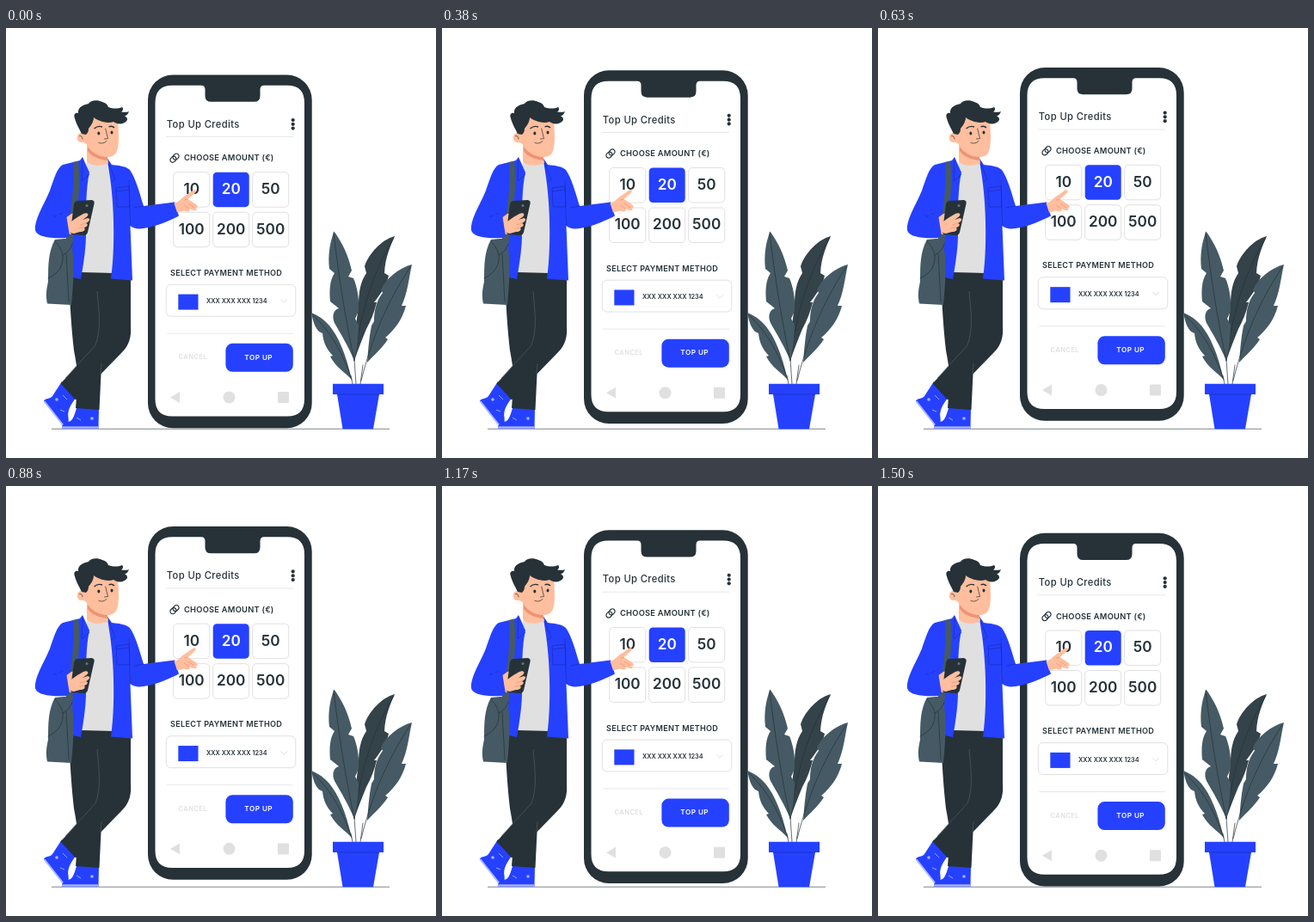
Write an HTML page that moves like this. It is 500 by 500 pixels and loops after 1540 ms.

```html
<!DOCTYPE html>
<html lang="en">
<head>
<meta charset="utf-8">
<title>Top up</title>
<style>
  html, body { margin: 0; width: 100%; height: 100%; overflow: hidden; background: #fff; }
  svg { display: block; width: 100%; height: 100%; }
  text { font-family: Inter, "Open Sans", sans-serif; font-weight: 600; fill: #263238; }
  .blue { fill: #2541ff; }
  .dark { fill: #263238; }
  .slate { fill: #455a64; }
  .skin { fill: #ffbe9d; }
  .grey { fill: #e0e0e0; }
  .box { fill: #fff; stroke: #e0e0e0; }
  .line { fill: none; stroke: #263238; stroke-width: .7; stroke-linecap: round; stroke-linejoin: round; }
  .seam { fill: none; stroke: #1a2db3; stroke-width: .7; }
  .rule { stroke: #e6e6e6; stroke-width: .9; }
</style>
</head>
<body>
<svg viewBox="0 0 500 500">
  <path d="M53 466.200H446" stroke="#263238" stroke-width=".6"/>

  <g id="phone">
    <rect class="dark" x="165" y="54.500" width="190.700" height="410.700" rx="29"/>
    <path fill="#fff" d="M193.500 66.800H227Q231.500 66.800 231.500 71.500V79Q231.500 85.800 238.500 85.800H288.500Q295.500 85.800 295.500 79V71.500Q295.500 66.800 300 66.800H327Q347 66.800 347 87V431.500Q347 451.500 327 451.500H193.500Q173.500 451.500 173.500 431.500V87Q173.500 66.800 193.500 66.800Z"/>

    <text x="186.800" y="115.700" font-size="11.200" letter-spacing=".38" style="font-weight:500">Top Up Credits</text>
    <g class="dark">
      <circle cx="333.700" cy="107" r="2.100"/>
      <circle cx="333.700" cy="111.800" r="2.100"/>
      <circle cx="333.700" cy="116.600" r="2.100"/>
    </g>
    <path class="rule" d="M186 126.500H334"/>

    <g class="line" transform="translate(196 151.200) rotate(-45)" style="stroke-width:1.200">
      <rect x="-6" y="-2.900" width="7.600" height="5.800" rx="2.900"/>
      <rect x="-1.600" y="-2.900" width="7.600" height="5.800" rx="2.900"/>
    </g>
    <text x="207" y="154.300" font-size="9.300" letter-spacing=".25">CHOOSE AMOUNT (€)</text>
    <g id="amounts" text-anchor="middle" font-size="17.200"></g>

    <text x="191" y="287.900" font-size="9.100" letter-spacing=".3">SELECT PAYMENT METHOD</text>
    <rect class="box" x="186.300" y="298.300" width="150.500" height="36.900" rx="5.500"/>
    <rect class="blue" x="200.300" y="309.600" width="23.200" height="18"/>
    <text x="233" y="320.300" font-size="7.300" letter-spacing=".05">XXX XXX XXX 1234</text>
    <path d="M319.300 315.800L323 319.400L326.700 315.800" fill="none" stroke="#e0e0e0"/>

    <path class="rule" d="M187 355.200H334"/>
    <text x="200.500" y="385.500" font-size="7.600" letter-spacing=".35" style="fill:#e0e0e0">CANCEL</text>
    <rect class="blue" x="255.400" y="366.800" width="78.400" height="33" rx="8"/>
    <text x="277.300" y="385.600" font-size="8.200" letter-spacing=".45" style="fill:#fff">TOP UP</text>

    <g class="grey">
      <path d="M191 429.400L202 423V436Z"/>
      <circle cx="259.500" cy="429.400" r="7"/>
      <rect x="316" y="423" width="13" height="13" rx="1"/>
    </g>
  </g>

  <g id="plant">
    <path class="line" d="M405 385L407 414M401 404L403 414M415 392L412 414"/>
    <path class="slate" d="M355 331C363 334 370 339 376 346C386 358 395 378 402 409C394 400 384 395 377 382L380 381C373 374 369 366 368 355L364 353C359 348 357 341 355 331Z"/>
    <path class="line" d="M357 334C377 353 391 376 402 409"/>
    <path d="M452 242C437 246 422 262 417 277L419 285C412 295 410 308 410 322L408 338C405 354 404 370 405 387C409 375 414 362 419 350C424 341 428 331 431 319L428 319C436 309 443 298 445 288L440 285C441 266 447 254 452 242Z" fill="#344249"/>
    <path class="line" d="M451 244C428 282 413 325 405 387"/>
    <path class="slate" d="M472 275C457 279 442 291 436 304L438 308C430 318 428 330 428 341L425 346C422 361 421 375 420 389C428 380 437 373 444 362L441 360C453 350 461 338 465 323L460 323C467 308 468 293 472 275Z"/>
    <path class="line" d="M470 278C449 310 428 350 413 410"/>
    <path class="slate" d="M381.500 236.500C377 248 374 264 376 280L382 285C376 294 376 306 377 318L387 326C380 328 379 336 382 343C390 357 398 370 405 387C408 374 410 358 410 345L406 338L410 329C411 314 408 300 404 291L398 289L402 282C398 264 391 250 381.500 236.500Z"/>
    <path class="line" d="M381 238C387 290 395 340 405 387"/>
    <path class="blue" d="M380 413.700H439V426H434L427 466.300H391.500L385 426H380Z"/>
    <path class="seam" d="M385 426H434"/>
  </g>

  <g id="shoes">
    <path class="blue" d="M65 411L82 429C75 438 71 445 72.500 453C73.500 461 71 465 67 462L44 433.500C46 430 51 432 54 428Z"/>
    <path d="M44.500 434L67 462.500" stroke="#a8b3ff" stroke-width="2"/>
    <path class="blue" d="M83 439L108 441L107.500 466H65C64 461 69 459 75 457C79 454 80 448 83 439Z"/>
    <path d="M65 464.500H107.500" stroke="#a8b3ff" stroke-width="2.500"/>
    <g fill="#a8b3ff">
      <circle cx="59" cy="432" r="1.800"/>
      <circle cx="100" cy="454" r="1.800"/>
    </g>
    <path d="M66 427L71 432M63 444L68 446M82 453L87 456" fill="none" stroke="#a8b3ff" stroke-width=".9"/>
  </g>

  <g id="legs">
    <path class="dark" d="M73 282C74 318 76 350 79 375C82 391 84 403 83 415L81 442L108.500 444L111 392L122 340L119 286Z"/>
    <path class="dark" d="M88 282L145 286L145 346C146 360 143 369 135 377L81 432.500L63.500 413.500L104 369C109 361 111 352 110 340Z"/>
    <path d="M106 306C108 330 111 350 104 369L69 407M111 390L110 402" fill="none" stroke="#56636a" stroke-width=".6"/>
  </g>

  <g id="body">
    <path class="grey" d="M94 155L119 156L125 172L130 235L126 285L87 284L90 190Z"/>
    <path class="blue" d="M117.500 151L123 159C132 160 140 161 144 165C151 175 155 191 160 207L196 202.500L201 218.500C188 225 174 231 160 233C153 234 148 233 144.500 230L147 293.500L122 291.500C126 265 127 217 121 174Z"/>
    <path class="blue" d="M89 150L97 168C93 186 93 208 93 239C93 254 91 269 87 292L73 289L70 244C56 245 36 244 34 235C33 222 45 204 51 189C56 175 59 163 66 159L86 154Z"/>
    <path class="seam" d="M118 154L127 176L122 179M128 186L143 184L144 208L129 208ZM128 190L143 188M143 177C144 195 143 213 145 230M160 207L149 209M89 153L88 178L97 170M66 215C61 218 58 219 55 219"/>
    <path class="slate" d="M78 156L84 155C87 177 85 205 77 247L70 247C76 210 80 184 78 156Z"/>
    <path class="slate" d="M57 246L78 244L77 257C80 275 78 301 76 322L48 320.500C46 311 47 304 49 295C49 276 49 260 57 246Z"/>
    <path class="line" d="M57 248C62 254 67 260 66 269C65 281 57 287 49 291M66 264C72 261 75 257 77 251M70 263L73 318"/>
  </g>

  <g id="arms">
    <path class="skin" d="M69 221L76 216L87 214L84 240L74 240L67 235Z"/>
    <path class="dark" d="M83 201L99.500 200Q103.500 200.500 102.500 204.500L95 237.500Q94 241 90 241L77 240Q74 239.500 75 235.500L79 205Q80 201 83 201Z"/>
    <circle cx="94" cy="206.500" r="1.500" fill="#65757d"/>
    <path class="skin" d="M68 230C74 226 79 223 83 220L90 216C95 214 97 217 94 219.500L89 223L95 221C99 222 97 225 93 227C96 228 95 231 91 232C93 235 90 237 86 237L79 239L69 237Z"/>
    <path d="M93 227L86 229M91 232L85 233" fill="none" stroke="#eb9981" stroke-width=".8"/>
    <path class="blue" d="M59 217L70 217L74 242L56 244Z"/>
    <path class="skin" d="M195.500 204C202 202 205 196 210 194L217 189C221 187 222 190 219 192.500L211.500 199L220 204.500C225 208 222 211 219 209L222 211C220 214 216 211 213 210C215 214 211 214 207 212.500L199 214.500Z"/>
    <path d="M219 209L212 204M213 210L207 206M211.500 199L207 200" fill="none" stroke="#eb9981" stroke-width=".8"/>
  </g>

  <g id="head">
    <path class="skin" d="M94 130V155C99 161 112 161 119 157L117 145Z"/>
    <path fill="#ed9476" d="M95 138C101 146 109 150 118 150L118 154C107 153 98 148 95 143Z"/>
    <ellipse class="skin" cx="87.500" cy="127.500" rx="4.700" ry="5.500"/>
    <path class="skin" d="M92 112L102 102L130 107C131 121 132 135 129 143C127 149 121 151 115 149.500C105 148 97 142 93.500 135L88 132Z"/>
    <path class="dark" d="M88 123C85 117 81 110 80 105C78 100 81 98 84 99C83 91 92 89 96 88C98 84 106 83 112 86C116 87 118 89 119 92C125 94 130 94 135 92C137 94 136 96 134 97.500C138 98 141 98 143 97C142 100 140 102 138 102.500C141 104 141 105 141 107C138 112 130 113 125 109C116 112 106 107 102 104C102 109 99 113 96 117C96 120 95 122 93 124Z"/>
    <g class="dark">
      <ellipse cx="107.800" cy="122.500" rx="1.500" ry="1.900"/>
      <ellipse cx="123" cy="121.500" rx="1.500" ry="1.900"/>
    </g>
    <path class="line" d="M115.700 117L118.500 128.500L114.500 129M108 133.500Q113 135.500 117 131.500M85.500 125.500Q89 125 89 129"/>
    <path d="M102.500 117Q107 113 112 115M119.500 115Q123 113 126 116" fill="none" stroke="#263238" stroke-width="1.400"/>
  </g>
</svg>

<script>
  const LOOP = 1540, PEAK = 715, SWING = 9.5;
  const phone = document.getElementById("phone");
  const amounts = document.getElementById("amounts");

  [10, 20, 50, 100, 200, 500].forEach((n, i) => {
    const x = 194.7 + i % 3 * 46;
    const y = 167.7 + Math.floor(i / 3) * 46.5;
    const on = n === 20;
    amounts.innerHTML +=
      `<rect class="${on ? "blue" : "box"}" x="${x}" y="${y}" width="42" height="40.500" rx="4.500"/>` +
      `<text x="${x + 21}" y="${y + 25.4}" style="fill:${on ? "#fff" : "#263238"}">${n}</text>`;
  });

  // Softly eased drop below the highest point, reached at PEAK
  function drop(t) {
    const d = Math.abs(t - PEAK);
    const u = Math.min(d, LOOP - d) / (LOOP / 2);
    const sine = (1 - Math.cos(Math.PI * u)) / 2;
    return SWING * (u + sine) / 2;
  }

  function draw(t) {
    phone.setAttribute("transform", `translate(0 ${(drop(t) - drop(0)).toFixed(3)})`);
  }

  function tick() {
    draw(performance.now() % LOOP);
    requestAnimationFrame(tick);
  }
  tick();
</script>
</body>
</html>
```
